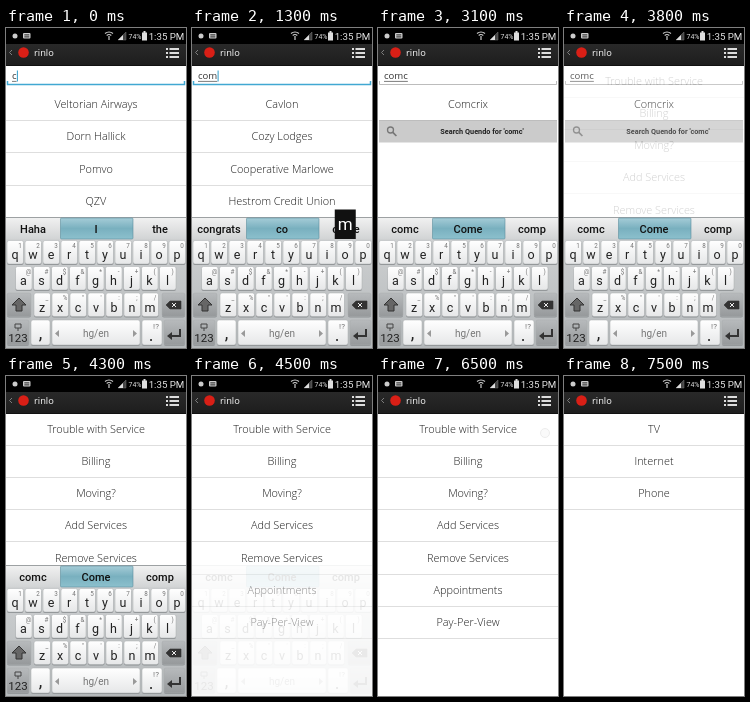
Animation, 180 px wide and 320 px high, one loop 8 s. Source, as an HTML page:

```html
<!DOCTYPE html>
<html lang="en">
<head>
<meta charset="utf-8">
<title>Phone directory search</title>
<style>
html, body { margin: 0; width: 100%; height: 100%; overflow: hidden; background: #fff; }
svg { display: block; width: 100%; height: 100%; }
text { font-family: Roboto, "Open Sans", sans-serif; text-anchor: middle; }
.row { font: 300 10.9px "Open Sans", sans-serif; fill: #1c1c1c; }
.typed { font: 400 9.6px "Open Sans", sans-serif; fill: #333; text-anchor: start; }
.search { font: 700 7.3px Roboto, sans-serif; fill: #222; }
.key { font-size: 12.5px; fill: #222; }
.hint { font-size: 6.3px; fill: #777; }
.word { font-size: 11px; fill: #111; font-weight: 500; }
</style>
</head>
<body>
<svg id="stage" viewBox="0 0 180 320"></svg>
<script>
const LOOP = 8000, STEP = 50;
const stage = document.getElementById('stage');

const rect = (x, y, w, h, fill, extra = '') =>
  `<rect x="${x}" y="${y}" width="${w}" height="${h}" fill="${fill}" ${extra}/>`;
const label = (x, y, text, cls, extra = '') =>
  `<text x="${x}" y="${y}" class="${cls}" ${extra}>${text}</text>`;
const path = (d, stroke, width = 1, fill = 'none') =>
  `<path d="${d}" fill="${fill}" stroke="${stroke}" stroke-width="${width}"/>`;
const gradient = (id, ...colors) =>
  `<linearGradient id="${id}" x2="0" y2="1">${colors.map((c, i) =>
    `<stop offset="${i / (colors.length - 1)}" stop-color="${c}"/>`).join('')}</linearGradient>`;

const ROW = 32.25;
const rows = (names, center) => names.map((name, i) => {
  const y = center + i * ROW;
  return label(90, y + 4, name, 'row') + rect(0, Math.round(y + 16), 180, 1, '#dedede');
}).join('');

const page = (id, top, content) =>
  `<g id="${id}">${rect(0, top, 180, 320 - top, '#fff')}${content}</g>`;

// Keyboard
const keyCenters = {};
const keyBox = (x, y, w, h, fill) =>
  rect(x, y + 1, w, h, '#8d9193', 'rx="2"') +
  rect(x, y, w, h, `url(#${fill})`, 'rx="2" stroke="#a9adaf" stroke-width=".5"');
const keyRow = (letters, hints, left, top) => [...letters].map((letter, i) => {
  const x = left + i * 18;
  keyCenters[letter] = [x + 8.25, top];
  return keyBox(x, top, 16.5, 23.5, 'light') +
    label(x + 8, top + 18.5, letter, 'key') +
    label(x + 13, top + 7, hints[i].replace('&', '&amp;'), 'hint');
}).join('');

function keyboard() {
  return rect(0, 189, 180, 131, 'url(#board)') +
    rect(0, 189, 180, 22, 'url(#strip)') +
    rect(0, 189, 180, 1, '#9da1a3') +
    rect(54.5, 190, 72.5, 21, 'url(#pick)', 'rx="1" stroke="#5d8f9e" stroke-width=".6"') +
    [27, 90, 154].map((x, i) => label(x, 204.5, '', 'word', `id="word${i}"`)).join('') +
    keyRow('qwertyuiop', '1234567890', 1, 212.5) +
    keyRow('asdfghjkl', '@#$&*-+()', 9.5, 238.5) +
    keyRow('zxcvbnm', '_%"\':;/', 28, 265) +
    keyBox(1, 265, 24, 23.5, 'dark') +
    path('M13 270l-7 7h4v6h6v-6h4z', '#333', 1, '#666') +
    keyBox(156, 265, 23, 23.5, 'dark') +
    path('M160 277l4-4h11v8h-11z', '#333', .6, '#333') +
    path('M166 275l4 4m0-4l-4 4', '#eee', 1) +
    keyBox(1, 292, 22, 25, 'dark') + label(12, 314, '123', 'key', 'style="font-size:11.5px"') +
    path('M9 296h6v4H9zM12 300v3', '#444', 1) +
    keyBox(25, 292, 19, 25, 'light') + label(34.5, 311, ',', 'key', 'style="font-size:18px"') +
    keyBox(46, 292, 88, 25, 'light') + label(90, 309, 'hg/en', 'key', 'style="font-size:10px;fill:#777"') +
    path('M53 302l-4 3.5 4 3.5zM127 302l4 3.5-4 3.5z', 'none', 0, '#999') +
    keyBox(136, 292, 20, 25, 'light') + label(145, 313, '.', 'key', 'style="font-size:18px"') +
    label(150, 301, '!?', 'hint', 'style="font-size:8px"') +
    keyBox(158, 292, 21, 25, 'dark') +
    path('M174 301v7h-9', '#333', 2) + path('M161 308l5-4v8z', 'none', 0, '#333');
}

function statusBar() {
  return rect(0, 0, 180, 16, '#000') +
    '<circle cx="9" cy="8" r="2.5" fill="#ccc"/>' +
    rect(17, 5, 7.5, 5.5, '#ccc', 'rx="1"') + rect(18.3, 6.4, 5, 1, '#222') + rect(18.3, 8.4, 5, 1, '#222') +
    path('M99 5.5q4-3 8 0M100.7 7.5q2.3-2 4.6 0M103 8v4', '#ccc', 1.2) +
    path('M112 12h8V4z', '#777', .5, '#444') + path('M112 12h5V7z', 'none', 0, '#ddd') +
    label(129, 10.5, '74%', '', 'font-size="7" fill="#ddd"') +
    rect(136, 4.5, 5, 8, '#ddd') + rect(137.5, 3, 2, 2, '#ddd') +
    label(160.5, 11.7, '1:35 PM', '', 'font-size="9.7" fill="#e4e4e4"');
}

function appBar() {
  const lines = [20, 24, 28].map(y =>
    rect(160, y, 2, 2, '#ddd') + rect(163.5, y, 9.5, 2, '#ddd')).join('');
  return rect(0, 16, 180, 22, 'url(#bar)') + rect(0, 37, 180, 1, '#111') +
    path('M6 22l-2.5 2.5L6 27', '#888', .9) +
    '<circle cx="17.5" cy="24.5" r="5.3" fill="#d91f16"/>' +
    label(28, 27.6, 'rinlo', '', 'style="font:400 9.3px \'Open Sans\',sans-serif;text-anchor:start" fill="#fff"') +
    lines;
}

stage.innerHTML = `<defs>
  ${gradient('bar', '#292929', '#1d1d1d')}
  ${gradient('board', '#d3d5d6', '#b4b8ba')}
  ${gradient('strip', '#f2f2f2', '#d2d4d5')}
  ${gradient('pick', '#a5ccd7', '#79b0bf', '#8cc0cd')}
  ${gradient('light', '#ffffff', '#e6e7e8')}
  ${gradient('dark', '#b7babc', '#96999b')}
  </defs>` +
  rect(0, 0, 180, 320, '#fff') +
  page('general', 38, rows(['Veltorian Airways', 'Dorn Hallick', 'Pomvo', 'QZV'], 76)) +
  page('filtered', 38, rows(['Cavlon', 'Cozy Lodges', 'Cooperative Marlowe', 'Hestrom Credit Union'], 76)) +
  page('match', 38,
    rect(0, 60, 180, 31, '#e6e6e6', 'id="matchTap"') + label(90, 80, 'Comcrix', 'row') +
    rect(1, 92, 178, 22.5, '#cbcbcb') + rect(1, 92, 178, .7, '#b8b8b8') +
    '<circle cx="12.5" cy="102" r="3" fill="none" stroke="#777" stroke-width="1.3"/>' +
    path('M14.6 104.2l3.8 3.8', '#777', 1.7) +
    label(104, 105.8, 'Search Quendo for \'comc\'', 'search')) +
  `<g id="field">${rect(0, 38, 180, 21.5, '#fff')}
    <path id="frame" d="M1.5 53v3.5h177V53" fill="none"/>
    <text id="typed" class="typed" x="6" y="51.3"></text>
    <path id="underline" stroke="#444" stroke-width=".7"/>
    <rect id="caret" y="42.5" width="1" height="11" fill="#2d9cc9"/></g>` +
  page('services', 38,
    rect(0, 38, 180, 30, '#eeeeee', 'id="serviceTap"') +
    rows(['Trouble with Service', 'Billing', 'Moving?', 'Add Services', 'Remove Services',
      'Appointments', 'Pay-Per-View'], 52.6) +
    '<circle id="touch" cx="167" cy="57" r="4.5" fill="#fafafa" stroke="#ededed"/>') +
  page('kinds', 38, rows(['TV', 'Internet', 'Phone'], 52.6)) +
  rect(0, 189, 180, 131, '#fff', 'id="veil"') +
  `<g id="keyboard">${keyboard()}</g>` +
  `<rect id="press" width="16.5" height="23.5" rx="2" fill="#5fa9bf" opacity="0"/>
   <g id="popup">${rect(-10.5, -31, 21, 29.5, '#111')}
   <text id="popupLetter" y="-10.5" font-size="17" fill="#fff"></text></g>` +
  statusBar() + appBar();

const el = {};
stage.querySelectorAll('[id]').forEach(node => { el[node.id] = node; });

// Timed tables: [time, value]
const fades = {
  filtered: [[350, 0], [650, 1]],
  match: [[2150, 0], [2400, 1]],
  services: [[3700, 0], [4200, 1]],
  kinds: [[6950, 0], [7500, 1]],
  veil: [[4300, 1], [4500, .45], [5000, 0]],
  keyboard: [[4300, 1], [4500, .1], [5000, 0]],
  matchTap: [[2600, 0], [2650, 1], [2700, 1], [2750, 0]],
  serviceTap: [[6000, 0], [6150, 1], [6350, 1], [6500, 0]],
  touch: [[6000, 0], [6150, 1]]
};
const typing = [[0, 'c'], [900, 'co'], [1300, 'com'], [1800, 'comc']];
const suggestions = [
  [0, ['Haha', 'I', 'the']],
  [400, ['can', 'c', 'come']],
  [1100, ['congrats', 'co', 'come']],
  [1500, ['come', 'com', 'coming']],
  [2050, ['comc', 'Come', 'comp']]
];
// Letter shown, key the popup stands over
const popups = [[0, null], [50, 'cc'], [300, null], [900, 'oo'], [1300, 'mo'],
  [1350, 'mm'], [1550, null], [1750, 'cc'], [2000, null]];

const current = (table, t) => table.filter(([time]) => time <= t).pop()[1];

function ramp(points, t) {
  const next = points.findIndex(([time]) => time > t);
  if (next === 0) return points[0][1];
  if (next < 0) return points[points.length - 1][1];
  const [t0, a] = points[next - 1], [t1, b] = points[next];
  return a + (b - a) * (t - t0) / (t1 - t0);
}

function render(t) {
  for (const id in fades) el[id].setAttribute('opacity', ramp(fades[id], t));

  el.typed.textContent = current(typing, t);
  const end = 6 + el.typed.getComputedTextLength();
  el.underline.setAttribute('d', `M6 53.4H${end}`);
  const focused = t < 3050;
  el.caret.setAttribute('x', end + .3);
  el.caret.setAttribute('opacity', focused ? 1 : 0);
  el.frame.setAttribute('stroke', focused ? '#41a8d2' : '#ababab');
  el.frame.setAttribute('stroke-width', focused ? 1.5 : .8);

  current(suggestions, t).forEach((word, i) => { el['word' + i].textContent = word; });

  const shown = current(popups, t);
  el.popup.setAttribute('opacity', shown ? 1 : 0);
  el.press.setAttribute('opacity', shown && shown[0] === shown[1] ? .45 : 0);
  if (shown) {
    const [x, y] = keyCenters[shown[1]];
    el.popup.setAttribute('transform', `translate(${x} ${y})`);
    el.popupLetter.textContent = shown[0];
    el.press.setAttribute('x', x - 8.25);
    el.press.setAttribute('y', y);
  }
}

const start = performance.now();
function tick() {
  const t = (performance.now() - start) % LOOP;
  render(Math.floor(t / STEP) * STEP);
  requestAnimationFrame(tick);
}
tick();
</script>
</body>
</html>
```
